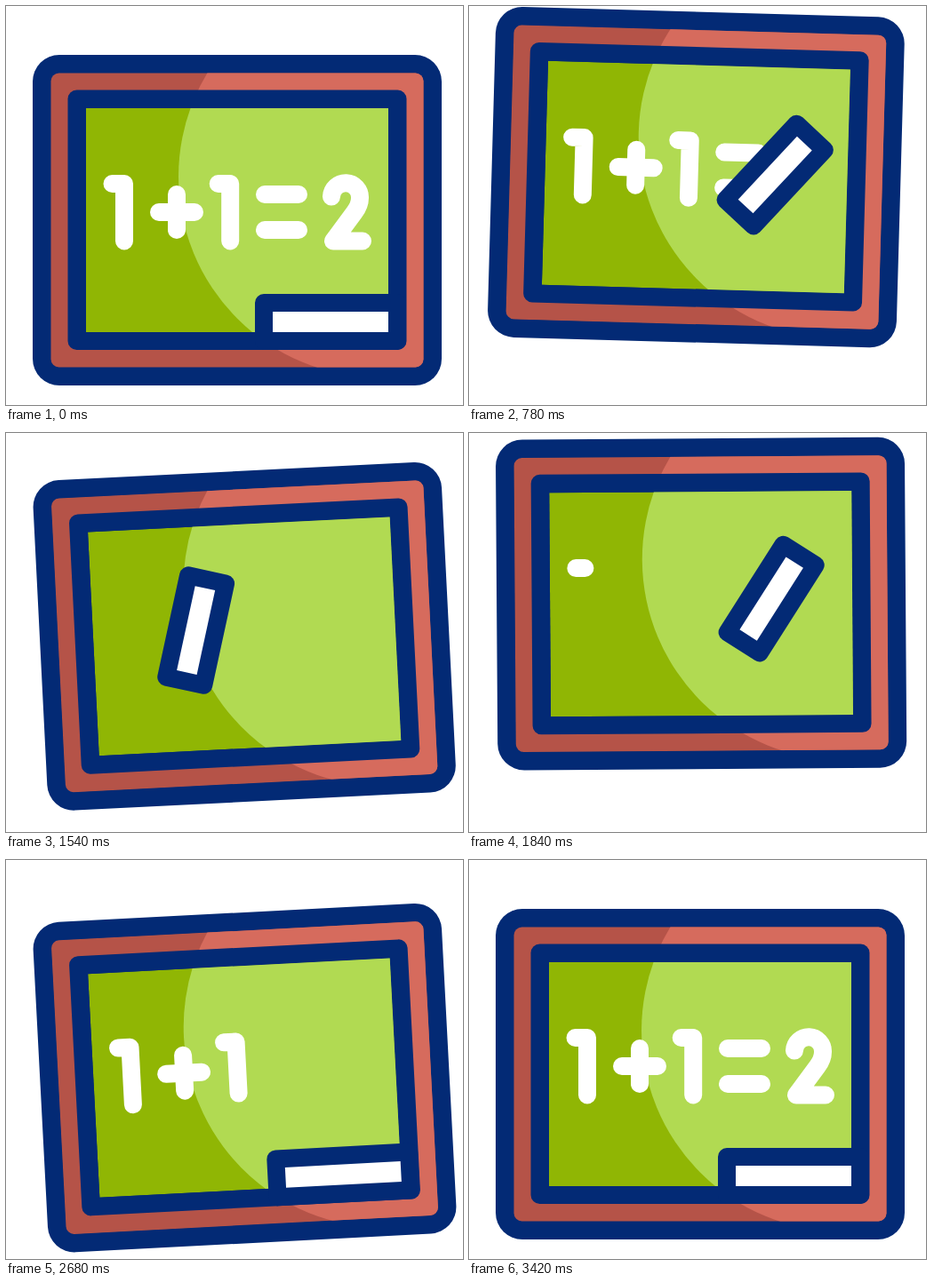
An HTML page that plays this animation: 514x449 px, repeating every 3600 ms.

```html
<!DOCTYPE html>
<html lang="en">
<head>
<meta charset="utf-8">
<title>Chalkboard</title>
<style>
  html, body { margin: 0; height: 100%; overflow: hidden; background: #fff; }
  svg { display: block; width: 100%; height: 100%; }
  .ink { fill: #032a75; }
  #eraser { fill: #fff; stroke: #032a75; stroke-width: 20; stroke-linejoin: round; }
  #sum { fill: none; stroke: #fff; stroke-width: 20; stroke-linecap: round; stroke-linejoin: round; }
</style>
</head>
<body>
<svg viewBox="0 0 514 449">
  <defs>
    <clipPath id="redArea"><rect x="50.5" y="75.5" width="419" height="331" rx="9"/></clipPath>
    <clipPath id="greenArea"><rect x="90" y="115" width="340" height="252"/></clipPath>
    <clipPath id="unwiped"><rect id="wipe" x="-800" y="-800" width="1600" height="800"/></clipPath>
  </defs>
  <g id="board">
    <rect class="ink" x="30" y="55" width="460" height="372" rx="30"/>
    <g clip-path="url(#redArea)">
      <rect x="50" y="75" width="420" height="332" fill="#b55348"/>
      <circle cx="420" cy="192" r="226" fill="#d66b5d"/>
    </g>
    <rect class="ink" x="69.5" y="94.5" width="381" height="292.5" rx="10"/>
    <g clip-path="url(#greenArea)">
      <rect x="90" y="115" width="340" height="252" fill="#90b604"/>
      <circle cx="420" cy="192" r="226" fill="#b1da52"/>
    </g>
    <g id="sum"></g>
    <rect id="eraser" y="-21.5" height="43"/>
  </g>
</svg>
<script>
const LOOP = 3600, BEAT = 548, START = 220;
const byId = id => document.getElementById(id);
const board = byId('board'), sum = byId('sum'), wipe = byId('wipe'), eraser = byId('eraser');

const clamp = x => Math.min(1, Math.max(0, x));
const ease = x => (1 - Math.cos(Math.PI * clamp(x))) / 2;

// Eased value of a track at time t, with one key per entry of times.
function track(t, times, values) {
  let v = values[0];
  for (let i = 1; i < times.length; i++)
    v += (values[i] - values[i - 1]) * ease((t - times[i - 1]) / (times[i] - times[i - 1]));
  return v;
}

const beats = start => [0, 1, 2, 3, 4, 5].map(i => start + i * BEAT);
const hopTimes = beats(START), tiltTimes = beats(START + BEAT / 2);
const eraserTimes = [START, 768, 1316, 1864, 2520];
const WIPED = 1316, WRITE = 1762, STAGGER = 322;

// Strokes of each character, in writing order.
const one = x => [`M${x} 200h13.5v64.5`];
const glyphs = [
  one(119.5),
  ['M172 232h40', 'M192 212v40'],
  one(238.7),
  ['M291 212h38', 'M291 252h38'],
  ['M366 214.500A16 16 0 0 1 398 216Q398 224 392 232L368 264.500H401']
];
const strokes = glyphs.flatMap((paths, glyph) => paths.map((d, part) => {
  const path = document.createElementNS('http://www.w3.org/2000/svg', 'path');
  path.setAttribute('d', d);
  path.setAttribute('pathLength', 1);
  sum.append(path);
  return { path, glyph, part, count: paths.length };
}));

function written(t, { glyph, part, count }) {
  if (t < WIPED) return 1;
  const duration = glyph === 4 ? 370 : 338;
  return clamp(ease((t - WRITE - glyph * STAGGER) / duration) * count - part);
}

function draw(t) {
  const hop = track(t, hopTimes, [0, -49, 10.5, -49, 10.5, 0]);
  const tilt = track(t, tiltTimes, [0, 3, -3, 3, -3, 0]);
  board.setAttribute('transform', `translate(0 ${hop}) rotate(${tilt} 240 78)`);

  const x = track(t, eraserTimes, [372, 349, 130, 340, 372]);
  const y = track(t, eraserTimes, [355.5, 236, 229, 236, 355.5]);
  const turn = track(t, eraserTimes, [0, -48.5, -85, -57, 0]);
  const stretch = track(t, [START, 380, 2350, 2520], [1, 0, 0, 1]);
  const width = 117 + 33 * stretch;
  const place = `translate(${x - 7 * stretch} ${y}) rotate(${turn})`;
  eraser.setAttribute('transform', place);
  eraser.setAttribute('x', -width / 2);
  eraser.setAttribute('width', width);

  // Only what lies ahead of the eraser's axis is still on the board.
  wipe.setAttribute('transform', place);
  sum.setAttribute('clip-path', t > START && t < WIPED ? 'url(#unwiped)' : 'none');
  for (const stroke of strokes) {
    const shown = written(t, stroke);
    stroke.path.setAttribute('visibility', shown > 0 ? 'visible' : 'hidden');
    stroke.path.setAttribute('stroke-dasharray', shown < 1 ? `${shown} 2` : 'none');
  }
}

function tick() {
  draw(performance.now() % LOOP);
  requestAnimationFrame(tick);
}
tick();
</script>
</body>
</html>
```
